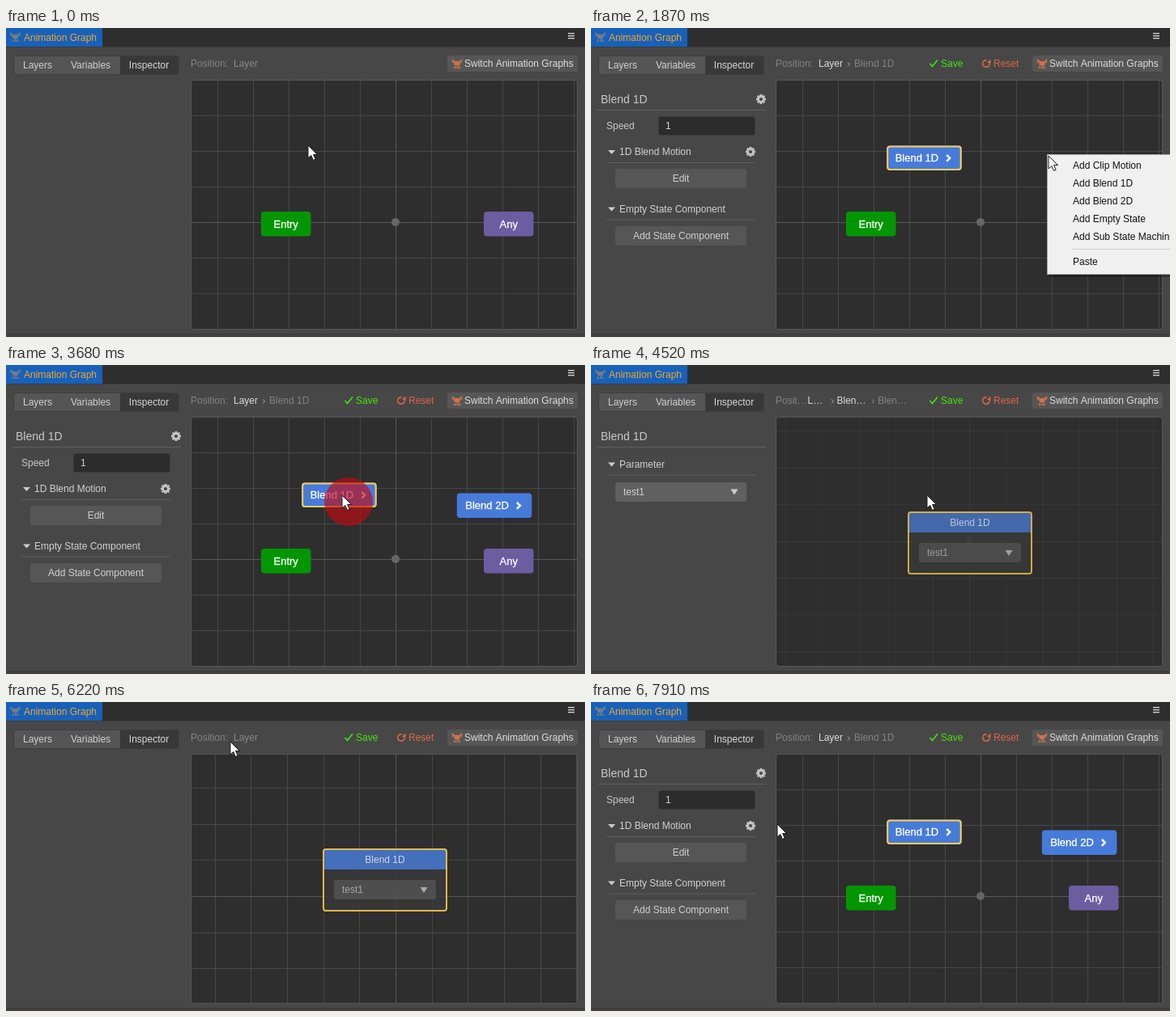
Write an HTML page with a canvas that moves like this. It is 715x382 px and loops after 8 s.

```html
<!DOCTYPE html>
<html lang="en">
<head>
<meta charset="utf-8">
<title>Animation Graph</title>
<style>
html, body { margin: 0; width: 100%; height: 100%; overflow: hidden; background: #474747; }
canvas { display: block; width: 715px; height: 382px; }
</style>
</head>
<body>
<canvas id="stage"></canvas>
<script>
const W = 715, H = 382, LOOP = 8000;
const cv = document.getElementById('stage');
const dpr = window.devicePixelRatio || 1;
cv.width = W * dpr;
cv.height = H * dpr;
const c = cv.getContext('2d', { alpha: false });

const clamp = v => Math.max(0, Math.min(1, v));
const ramp = (t, a, b) => clamp((t - a) / (b - a));
const mix = (a, b, k) => a + (b - a) * k;
const ease = k => k * k * (3 - 2 * k);

// Cursor stops: time, x, y
const PATH = [
  [0, 373, 145], [390, 373, 145], [640, 418, 177], [880, 418, 177],
  [1410, 565, 158], [1880, 565, 158], [2500, 612, 213], [2720, 612, 213],
  [3360, 415, 161], [4650, 415, 161], [5220, 428, 191], [5330, 428, 191],
  [5910, 280, 53], [6080, 280, 53], [6150, 277, 49], [6480, 277, 49],
  [7320, 411, 163], [7690, 411, 163], [7910, 230, 151], [LOOP, 230, 151]
];
// Press marks: start, end, final radius
const PRESSES = [[3510, 3920, 30], [6080, 6170, 25], [7440, 7660, 30]];
// Context menus: open, close, left, top
const MENUS = [[170, 790, 371, 143], [1730, 2660, 563, 156]];
const ITEMS = ['Add Clip Motion', 'Add Blend 1D', 'Add Blend 2D', 'Add Empty State', 'Add Sub State Machine', 'Paste'];

function cursorAt(t) {
  const i = Math.max(1, PATH.findIndex(p => p[0] > t));
  const a = PATH[i - 1], b = PATH[i];
  const k = ease(ramp(t, a[0], b[0]));
  return [mix(a[1], b[1], k), mix(a[2], b[2], k)];
}

function rect(x, y, w, h, fill) {
  c.fillStyle = fill;
  c.fillRect(x, y, w, h);
}

function box(x, y, w, h, r, fill, stroke, lw = 1) {
  c.beginPath();
  c.roundRect(x, y, w, h, r);
  if (fill) { c.fillStyle = fill; c.fill(); }
  if (stroke) { c.strokeStyle = stroke; c.lineWidth = lw; c.stroke(); }
}

function poly(pts, fill, stroke, lw = 1, close = true) {
  c.beginPath();
  for (let i = 0; i < pts.length; i += 2) c.lineTo(pts[i], pts[i + 1]);
  if (close) c.closePath();
  if (fill) { c.fillStyle = fill; c.fill(); }
  if (stroke) { c.strokeStyle = stroke; c.lineWidth = lw; c.stroke(); }
}

function disc(x, y, r, fill) {
  c.beginPath();
  c.arc(x, y, r, 0, 7);
  c.fillStyle = fill;
  c.fill();
}

function text(s, x, y, color, size = 12, align = 'left') {
  c.font = size + 'px "Liberation Sans", Arial, sans-serif';
  c.textAlign = align;
  c.fillStyle = color;
  c.fillText(s, x, y);
}

function triangle(x, y, w, h, color) {
  poly([x, y, x + w, y, x + w / 2, y + h], color);
}

function gear(x, y) {
  c.save();
  c.translate(x, y);
  for (let i = 0; i < 8; i++) {
    rect(-1.4, -6, 2.8, 3, '#c4c4c4');
    c.rotate(Math.PI / 4);
  }
  c.restore();
  c.beginPath();
  c.arc(0 + x, y, 3.4, 0, 7);
  c.strokeStyle = '#c4c4c4';
  c.lineWidth = 2.6;
  c.stroke();
}

function graphIcon(x, y, color) {
  box(x + 3, y + 3, 7, 5, 1, color);
  poly([x, y, x + 4, y + 3, x + 1, y + 6], color);
  poly([x + 13, y, x + 9, y + 3, x + 12, y + 6], color);
  poly([x + 4, y + 8, x + 2, y + 12, x + 5, y + 12], color);
  poly([x + 9, y + 8, x + 11, y + 12, x + 8, y + 12], color);
  rect(x + 6, y + 8, 1.5, 4, color);
}

function frameUi(dirty) {
  rect(0, 0, W, H, '#474747');
  rect(0, 0, W, 23, '#2e2e2e');
  rect(0, 23, W, 1, '#3c3c3c');
  rect(0, 0, 119, 23, '#1761bb');
  graphIcon(5, 5, '#777c82');
  text('Animation Graph', 22, 16, '#f5a623');
  for (const y of [6, 9, 12]) rect(694, y, 8, 1.4, '#cccccc');

  box(9.5, 34.5, 204, 23, 3, '#555555', '#3d3d3d');
  rect(141, 35, 72, 22, '#383838');
  text('Layers', 39, 50, '#cfcfcf', 12, 'center');
  text('Variables', 104.5, 50, '#cfcfcf', 12, 'center');
  text('Inspector', 176.5, 50, '#d6d6d6', 12, 'center');

  box(545, 34, 161, 20, 3, '#565656');
  graphIcon(550.5, 38, '#d0734a');
  text('Switch Animation Graphs', 566, 48, '#dedede');

  if (dirty) {
    poly([418.5, 44, 421.5, 47.5, 428, 39.5], null, '#45e60b', 1.6, false);
    text('Save', 432, 48, '#45e60b');
    c.beginPath();
    c.arc(488, 44, 4.2, -0.5, 4.9);
    c.strokeStyle = '#e0654b';
    c.lineWidth = 1.6;
    c.stroke();
    poly([493.5, 38.5, 493.5, 43, 489, 43], '#e0654b');
    text('Reset', 497, 48, '#e0654b');
  }
  rect(0, 378, W, 1, '#3a3a3a');
  rect(0, 379, W, 3, '#463f40');
}

function chevron(x, y, h, color, lw) {
  poly([x, y - h, x + h, y, x, y + h], null, color, lw, false);
}

function breadcrumb(name, inner) {
  const dim = '#868086', lit = '#dcdcdc';
  if (inner) {
    text('Posit…', 228, 48, dim);
    text('L…', 267.5, 48, lit);
    chevron(297, 45, 2.6, '#b0b0b0', 1);
    text('Blen…', 303.5, 48, lit);
    chevron(347, 45, 2.6, '#9090a8', 1);
    text('Blen…', 354, 48, dim);
    return;
  }
  text('Position:', 228, 48, dim);
  text('Layer', 281, 48, name ? lit : '#8b868b');
  if (name) {
    chevron(317, 45, 2.6, '#b0b0b0', 1);
    text(name, 325, 48, dim);
  }
}

function section(name, y) {
  triangle(21, y - 2, 9, 5, '#cccccc');
  text(name, 35, y + 4, '#d2d2d2');
  rect(19, y + 13, 184, 1, '#5e5e5e');
}

function button(name, y) {
  box(30, y, 162, 24, 3, '#565656');
  text(name, 111, y + 16, '#d0d0d0', 12, 'center');
}

function inspector(name, inner) {
  if (!name) return;
  text(name, 12, 93, '#c8c8c8', 14);
  rect(8, 101, 208, 1, '#606060');
  if (inner) {
    section('Parameter', 122.5);
    box(30, 145, 162, 24, 3, '#606060');
    text('test1', 40, 161, '#d0d0d0');
    triangle(172.5, 153.5, 9, 7, '#cccccc');
    return;
  }
  gear(210, 88);
  text('Speed', 19, 125, '#c8c8c8');
  box(83.5, 109.5, 119, 23, 3, '#2c2c2c', '#3a3a3a');
  text('1', 92, 125, '#d0d0d0');
  section(name.slice(6) + ' Blend Motion', 153);
  gear(197, 153);
  button('Edit', 174);
  section('Empty State Component', 223.5);
  button('Add State Component', 245);
}

function grid(cx, cy, step, alpha) {
  c.globalAlpha = alpha;
  const line = (v, lo, hi, draw) => {
    for (let i = Math.ceil((lo - v) / step); v + i * step < hi; i++) {
      draw(v + i * step, i === 0 ? '#575757' : '#474747');
    }
  };
  line(cx, 229, 705, (x, col) => rect(Math.round(x), 65, 1, 307, col));
  line(cy, 65, 372, (y, col) => rect(229, Math.round(y), 476, 1, col));
  disc(cx, cy, 5, '#666666');
  c.globalAlpha = 1;
}

function label(s, x, y, align) {
  text(s, x, y, '#ffffff', 13, align);
  c.strokeStyle = '#ffffff';
  c.lineWidth = 0.3;
  c.strokeText(s, x, y);
}

function plainNode(name, x, fill) {
  box(x, 227, 61.5, 30.5, 4, fill);
  label(name, x + 30.7, 247, 'center');
}

function blendNode(name, x, y, selected) {
  box(x, y, 92.5, 30.5, 4, '#477bda');
  if (selected) box(x + 1, y + 1, 90.5, 28.5, 3, null, '#fccf5a', 2);
  label(name, x + 10.5, y + 19.5, 'left');
  chevron(x + 74, y + 15.3, 4, '#ffffff', 2.4);
}

function layerView(t, selected, alpha) {
  c.globalAlpha = alpha;
  plainNode('Entry', 315, '#029702');
  plainNode('Any', 590, '#6a5ea1');
  if (t >= 790) blendNode('Blend 1D', 365.2, 145.5, selected === 'Blend 1D');
  if (t >= 2660) blendNode('Blend 2D', 556.8, 158.5, selected === 'Blend 2D');
  c.globalAlpha = 1;
}

function blendView(alpha) {
  c.globalAlpha = alpha;
  box(392, 182, 152, 76, 3, 'rgba(58,58,58,0.9)');
  rect(392, 182, 152, 25, '#4675c8');
  box(405, 220, 126, 24, 3, 'rgba(86,86,86,0.85)');
  text('Blend 1D', 468, 199, '#e0e0e0', 12, 'center');
  text('test1', 415, 236, '#b0b0b0');
  triangle(511.5, 229, 9, 7, '#b4b4b4');
  box(392, 182, 152, 76, 3, null, '#f4c44c', 2);
  c.globalAlpha = 1;
}

function menu(x, y, py) {
  const w = 189, h = 149;
  rect(x + 3, y + 3, w, h, 'rgba(0,0,0,0.3)');
  box(x + 0.5, y + 0.5, w - 1, h - 1, 0, '#f0f0f0', '#a5a5a5');
  const hot = Math.floor((py - y - 4) / 22);
  ITEMS.forEach((s, i) => {
    const iy = y + 3 + i * 22 + (i === 5 ? 9 : 0);
    if (i === hot) rect(x + 3, iy, w - 6, 22, '#91c9f7');
    text(s, x + 32, iy + 15, '#111111');
  });
  rect(x + 30, y + 117, w - 34, 1, '#cfcfcf');
}

function pointer(x, y) {
  poly([x, y, x, y + 16, x + 3.8, y + 12.5, x + 6.5, y + 18.5, x + 9.2, y + 17.3,
    x + 6.6, y + 11.5, x + 11.5, y + 11.5], '#ffffff', '#1a1a1a', 1);
}

function selectedAt(t) {
  if (t < 790 || (t >= 6150 && t < 7460)) return '';
  return t >= 2660 && t < 3510 ? 'Blend 2D' : 'Blend 1D';
}

function draw(t) {
  c.setTransform(dpr, 0, 0, dpr, 0, 0);
  const name = selectedAt(t);
  const inner = t >= 4250 && t < 6150;
  const [px, py] = cursorAt(t);

  frameUi(t >= 790);
  breadcrumb(name, inner);
  inspector(name, inner);

  box(228.5, 64.5, 477, 308, 3, '#2e2e2e', '#585858');
  c.save();
  c.beginPath();
  c.rect(229, 65, 476, 307);
  c.clip();
  if (t < 4200) {
    const out = 1 - ramp(t, 3900, 4200);
    grid(481, 240, 44, out);
    layerView(t, name, out);
  } else {
    const k = ease(ramp(t, 4520, 5220));
    const step = mix(mix(45.4, 44.7, k), 44, ease(ramp(t, 6220, 6840)));
    grid(mix(467, 481, k), mix(217.5, 240, k), step, ramp(t, 4200, 5100));
    if (t < 6700) blendView(ramp(t, 4200, 4600) * (1 - ramp(t, 6180, 6660)));
    if (t > 6450) layerView(t, name, ramp(t, 6450, 6980));
  }
  c.restore();

  for (const [open, close, x, y] of MENUS) {
    if (t >= open && t < close) menu(x, y, py);
  }
  for (const [from, to, r] of PRESSES) {
    if (t >= from && t < to) {
      disc(px + 8, py + 8, mix(r * 0.6, r, ramp(t, from, from + 150)), 'rgba(192,10,18,0.65)');
    }
  }
  pointer(px, py);
}

const start = performance.now();
function tick() {
  draw((performance.now() - start) % LOOP);
  requestAnimationFrame(tick);
}
tick();
</script>
</body>
</html>
```
